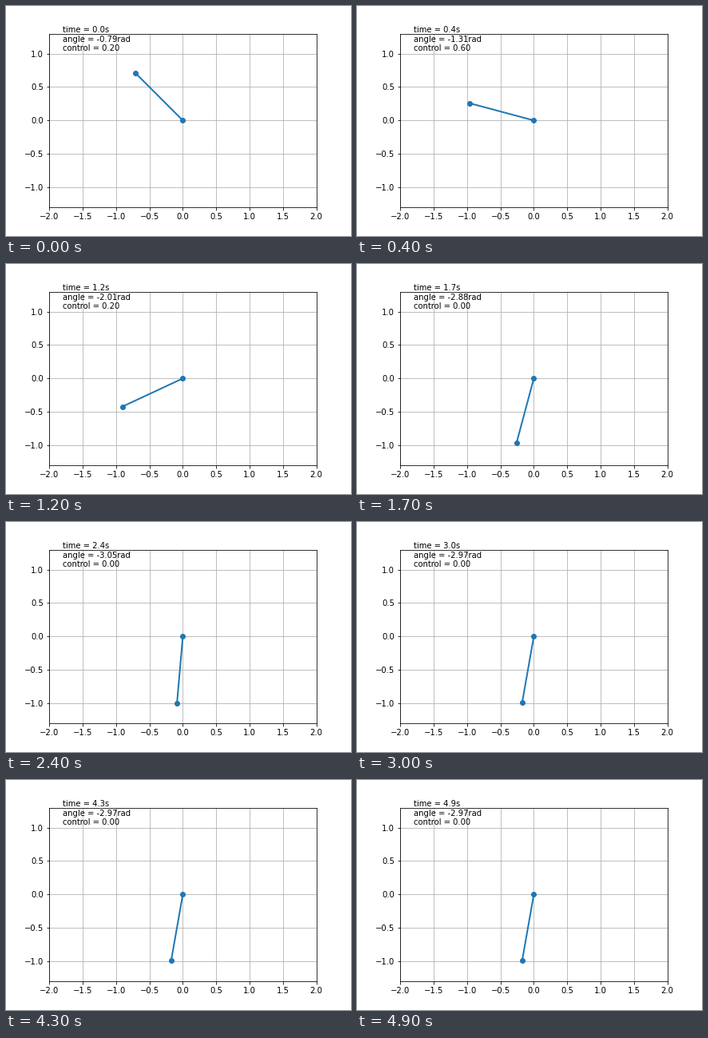
Recreate the animation shown at these times as a matplotlib script. Size 432x288 px, loop 5000 ms.

```python
import matplotlib.pyplot as plt
import numpy as np
from matplotlib.animation import FuncAnimation

FRAMES, STEP = 50, 0.1
GRID = 5  # angle resolution in degrees

plt.rcParams["font.family"] = "DejaVu Sans"
plt.rcParams["font.size"] = 10


def angle_at(i):
    """Pendulum angle in degrees: a fall, then a small wobble near rest."""
    if i < 24:
        fall = np.interp(i, [0, 4, 12, 18, 19], [45, 75, 115, 175, 180])
        return -GRID * round(fall / GRID)
    swing = GRID * (i // 3 % 2)
    return -(175 if i < 30 else 170) - swing


def control_at(i):
    level = np.interp(i, [0, 3, 8, 12, 16], [0.2, 0.6, 0.6, 0.2, 0])
    return 0.2 * round(level / 0.2)


fig, ax = plt.subplots(figsize=(6, 4), dpi=72, facecolor="white")
fig.subplots_adjust(left=0.125, right=0.9, bottom=0.125, top=0.88)
ax.set(xlim=(-2, 2), ylim=(-1.3, 1.3), aspect="equal")
ax.grid()

rod, = ax.plot([], [], "o-", color="C0", lw=2)
label = ax.text(0.05, 0.9, "", transform=ax.transAxes)


def draw(i):
    theta = np.radians(angle_at(i))
    rod.set_data([0, np.sin(theta)], [0, np.cos(theta)])
    label.set_text(
        f"time = {i * STEP:.1f}s\n"
        f"angle = {theta:.2f}rad\n"
        f"control = {control_at(i):.2f}"
    )
    return rod, label


anim = FuncAnimation(fig, draw, frames=FRAMES, interval=100, repeat=True,
                     repeat_delay=0)
plt.show()
```
